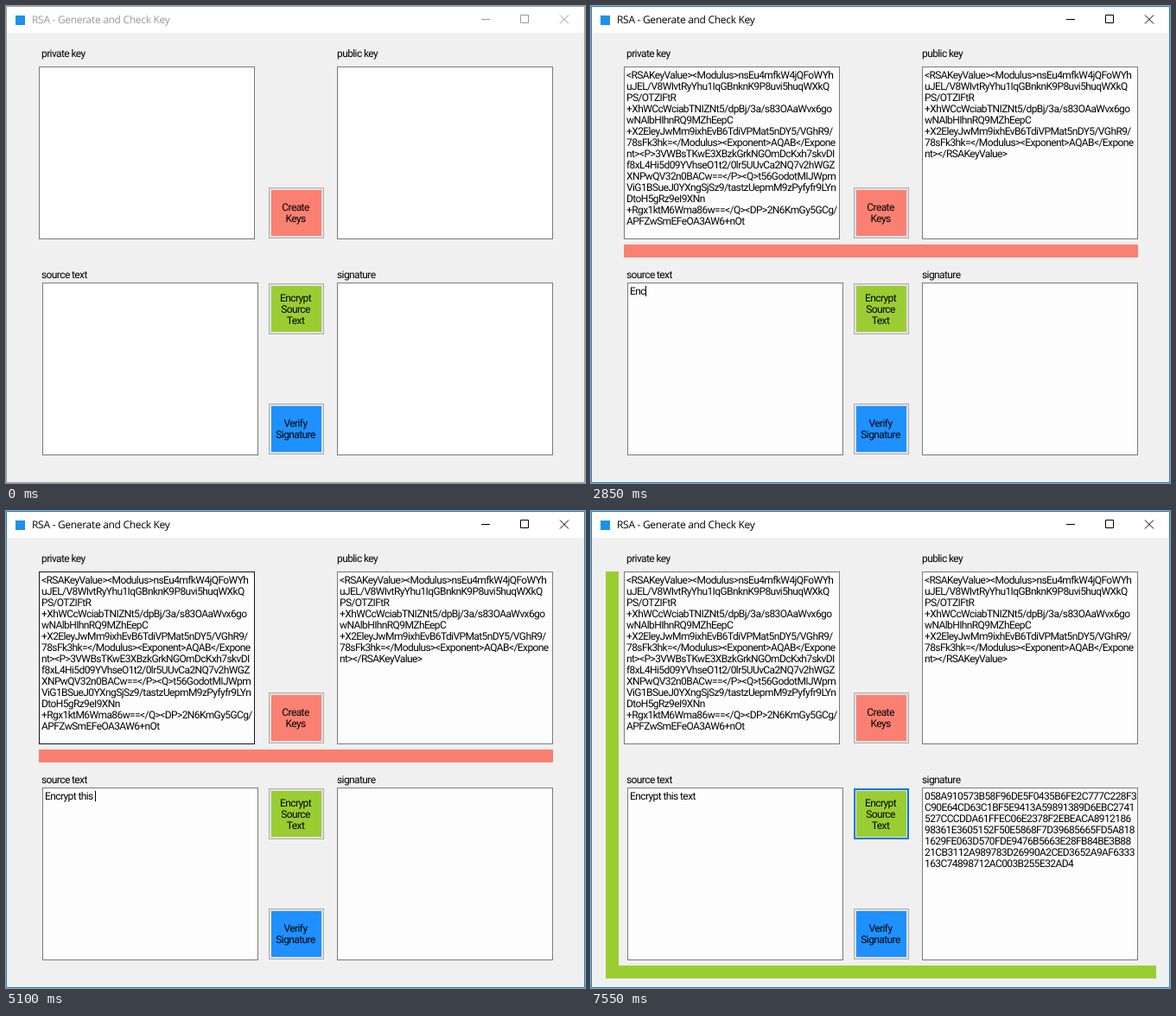
Animation, 670 px wide and 552 px high, one loop 8 s. Source, as an HTML page:

```html
<!DOCTYPE html>
<html lang="en">
<head>
<meta charset="utf-8">
<title>Key form</title>
<style>
html, body { margin: 0; width: 100%; height: 100%; overflow: hidden; background: #f0f0f0; }
svg { display: block; }
text {
  font: 12px Roboto, "Liberation Sans", sans-serif;
  letter-spacing: -0.6px;
  white-space: pre;
  text-rendering: geometricPrecision;
  fill: #000;
}
.title { font: 12px "Open Sans", "Noto Sans", sans-serif; letter-spacing: -0.3px; }
</style>
</head>
<body>
<svg id="stage" width="670" height="552" viewBox="0 0 670 552"></svg>
<script>
const LOOP = 8000;
const KEYS_AT = 1000, TYPE_AT = 2500, SIGN_AT = 7550;
const MESSAGE = 'Encrypt this text';
// [time, number of typed characters]
const TYPING = [
  [2500, 1], [2700, 2], [2850, 3], [3250, 4], [3350, 5], [3550, 6], [3850, 7], [4050, 8],
  [4300, 10], [4700, 12], [5100, 13], [5300, 14], [5450, 15], [5650, 16], [6050, 17]
];
const SHARED = [
  '<RSAKeyValue><Modulus>nsEu4mfkW4jQFoWYh',
  'uJEL/V8WIvtRyYhu1IqGBnknK9P8uvi5huqWXkQ',
  'PS/OTZIFtR',
  '+XhWCcWciabTNIZNt5/dpBj/3a/s83OAaWvx6go',
  'wNAlbHIhnRQ9MZhEepC',
  '+X2EleyJwMm9ixhEvB6TdiVPMat5nDY5/VGhR9/',
  '78sFk3hk=</Modulus><Exponent>AQAB</Expone'
];
const PRIVATE = [
  ...SHARED,
  'nt><P>3VWBsTKwE3XBzkGrkNGOmDcKxh7skvDI',
  'f8xL4Hi5d09YVhseO1t2/0lr5UUvCa2NQ7v2hWGZ',
  'XNPwQV32n0BACw==</P><Q>t56GodotMIJWpm',
  'ViG1BSueJ0YXngSjSz9/tastzUepmM9zPyfyfr9LYn',
  'DtoH5gRz9eI9XNn',
  '+Rgx1ktM6Wma86w==</Q><DP>2N6KmGy5GCg/',
  'APFZwSmEFeOA3AW6+nOt'
];
const PUBLIC = [...SHARED, 'nt></RSAKeyValue>'];
const SIGNATURE = [
  '058A910573B58F96DE5F0435B6FE2C777C228F3',
  'C90E64CD63C1BF5E9413A59891389D6EBC2741',
  '527CCCDDA61FFEC06E2378F2EBEACA8912186',
  '98361E3605152F50E5868F7D39685665FD5A818',
  '1629FE063D570FDE9476B5663E28FB84BE3B88',
  '21CB3112A989783D26990A2CED3652A9AF6333',
  '163C74898712AC003B255E32AD4'
];

const stage = document.getElementById('stage');

function set(node, attrs) {
  for (const name in attrs) node.setAttribute(name, attrs[name]);
  return node;
}

function add(tag, attrs, parent = stage) {
  const node = document.createElementNS('http://www.w3.org/2000/svg', tag);
  return parent.appendChild(set(node, attrs));
}

function rect(x, y, width, height, fill, parent) {
  return add('rect', { x, y, width, height, fill }, parent);
}

function frame(x, y, width, height, stroke, fill = 'none', line = 1) {
  return add('rect', {
    x: x + line / 2, y: y + line / 2, width: width - line, height: height - line,
    fill, stroke, 'stroke-width': line
  });
}

function write(x, y, string, attrs = {}, parent = stage) {
  const node = add('text', { x, y, ...attrs }, parent);
  node.textContent = string;
  return node;
}

function block(x, y, lines, attrs) {
  const group = add('g', {});
  lines.forEach((line, i) => write(x, y + i * 13, line, attrs, group));
  return group;
}

function button(y, fill, lines, firstLine) {
  rect(304, y, 64, 59, '#e1e1e1');
  rect(307, y + 3, 58, 53, fill);
  frame(304, y, 64, 59, '#adadad');
  const focus = frame(304, y, 64, 59, '#0078d7', 'none', 2);
  block(335, firstLine, lines, { 'text-anchor': 'middle' });
  return focus;
}

function show(node, on) {
  node.setAttribute('visibility', on ? 'visible' : 'hidden');
}

rect(0, 0, 670, 552, '#f0f0f0');
rect(0, 0, 670, 31, '#fff');
const edge = frame(0, 0, 670, 552, '#999');
rect(11, 11, 11, 11, '#1e90e8');
const title = write(30, 20, 'RSA - Generate and Check Key', { class: 'title' });
const controls = add('path', {
  d: 'M550 15.5h10M595.5 10.5h9v9h-9zM641 10.5l10 10M651 10.5l-10 10', fill: 'none'
});

write(41, 59, 'private key');
write(383, 59, 'public key');
write(41, 315, 'source text');
write(383, 315, 'signature');

const boxes = [[38, 70], [383, 70], [42, 320], [383, 320]]
  .map(([x, y]) => frame(x, y, 250, 200, '#7a7a7a', '#fff'));
const [privateBox, , sourceBox] = boxes;

const createFocus = button(210, '#fa8072', ['Create', 'Keys'], 237);
const encryptFocus = button(321, '#9acd32', ['Encrypt', 'Source', 'Text'], 342);
show(button(460, '#1e90ff', ['Verify', 'Signature'], 487), false);

const keys = [block(41, 84, PRIVATE), block(386, 84, PUBLIC)];
const signature = block(386, 334, SIGNATURE);
const typed = write(45, 334, '');
const caret = rect(0, 324, 1, 12, '#000');

const redBar = rect(38, 276, 595, 15, '#fa8072');
const greenBar = add('path', { d: 'M17 70h15v456h622v15H17z', fill: '#9acd32' });

function draw(t) {
  const active = t >= KEYS_AT, signed = t >= SIGN_AT;
  const within = (from, to) => t >= from && t < to;

  set(edge, { stroke: active ? '#1883d7' : '#999' });
  title.style.fill = active ? '#000' : '#999';
  set(controls, { stroke: active ? '#000' : '#999' });

  for (const box of boxes) set(box, { stroke: '#7a7a7a', fill: active ? '#fdfdfd' : '#fff' });
  if (within(KEYS_AT, TYPE_AT) || within(5100, 5300)) set(privateBox, { stroke: '#171717' });
  if (within(TYPE_AT, 2700)) set(sourceBox, { stroke: '#0078d7' });

  for (const key of keys) show(key, active);
  show(createFocus, within(KEYS_AT, TYPE_AT));
  show(redBar, active && !signed);
  show(encryptFocus, signed);
  show(greenBar, signed);
  show(signature, signed);

  let count = 0;
  for (const [time, n] of TYPING) if (t >= time) count = n;
  const string = MESSAGE.slice(0, count);
  if (typed.textContent !== string) typed.textContent = string;
  show(caret, count > 0 && !signed);
  if (count) set(caret, { x: Math.round(45 + typed.getComputedTextLength()) });
}

const start = performance.now();
function tick() {
  draw((performance.now() - start) % LOOP);
  requestAnimationFrame(tick);
}
tick();
</script>
</body>
</html>
```
